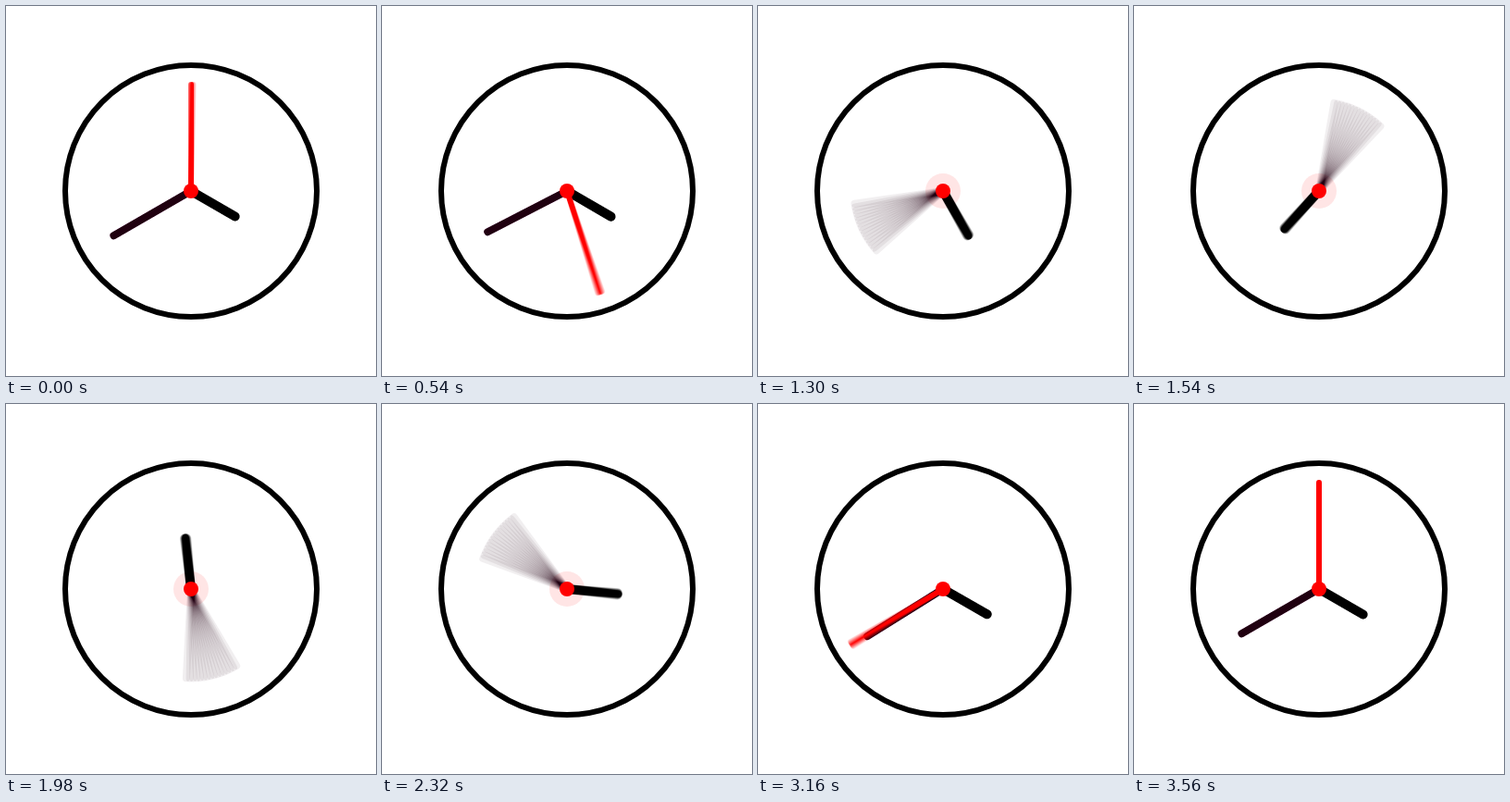
These frames come from a looping animation (400x400 px, 3600 ms). An HTML page with a canvas:

```html
<!DOCTYPE html>
<html lang="en">
<head>
<meta charset="utf-8">
<title>Clock</title>
<style>
  html, body { margin: 0; width: 100%; height: 100%; overflow: hidden; background: #fff; }
  canvas { display: block; width: 100vmin; height: 100vmin; }
</style>
</head>
<body>
<canvas id="stage" width="400" height="400"></canvas>
<script>
const SIZE = 400, MID = SIZE / 2, LOOP = 3600, FRAME = 20;
const SAMPLES = 16, SHUTTER = FRAME / 2;
const FAST = 1200, SLOW = 2400, RESUME = 2410, STOP = 3540;

const ctx = document.getElementById('stage').getContext('2d');
const layer = document.createElement('canvas');
layer.width = layer.height = SIZE;
const ink = layer.getContext('2d');
ink.lineCap = 'round';

const clamp = x => Math.min(1, Math.max(0, x));
const rushing = ms => ms > FAST && ms < SLOW;

// Clock minutes gone by: one slow minute, a rush of 718, one slow minute.
const elapsed = ms =>
  clamp(ms / FAST) +
  718 * clamp((ms - FAST) / (SLOW - FAST)) +
  clamp((ms - RESUME) / (STOP - RESUME));

const hands = [
  { length: 55, width: 10, color: '#000', start: 120, rate: 0.5 },
  { length: 96.5, width: 8, color: '#180408', start: 240, rate: 6 },
  { length: 115, width: 6, color: '#f00', start: 0, rate: 360, skip: rushing }
];

function disc(radius, color) {
  ctx.fillStyle = color;
  ctx.beginPath();
  ctx.arc(MID, MID, radius, 0, 2 * Math.PI);
  ctx.fill();
}

// Averages the hand over the open shutter, centred on ms.
function drawHand({ length, width, color, start, rate, skip }, ms) {
  ink.globalCompositeOperation = 'lighter';
  ink.clearRect(0, 0, SIZE, SIZE);
  ink.globalAlpha = 1 / SAMPLES;
  ink.strokeStyle = color;
  ink.lineWidth = width;
  for (let i = 0; i < SAMPLES; i++) {
    const at = ms + ((i + 0.5) / SAMPLES - 0.5) * SHUTTER;
    if (skip && skip(at)) continue;
    const a = (start + rate * elapsed(at)) * Math.PI / 180;
    ink.beginPath();
    ink.moveTo(MID, MID);
    ink.lineTo(MID + length * Math.sin(a), MID - length * Math.cos(a));
    ink.stroke();
  }
  ctx.drawImage(layer, 0, 0);
}

function draw(ms) {
  ctx.fillStyle = '#fff';
  ctx.fillRect(0, 0, SIZE, SIZE);
  ctx.strokeStyle = '#000';
  ctx.lineWidth = 6;
  ctx.beginPath();
  ctx.arc(MID, MID, 136, 0, 2 * Math.PI);
  ctx.stroke();
  if (rushing(ms)) disc(19, '#ffe5e5');
  for (const hand of hands) drawHand(hand, ms);
  disc(8, '#f00');
}

const begin = performance.now();
function tick() {
  const ms = (performance.now() - begin) % LOOP;
  draw(Math.floor(ms / FRAME) * FRAME);
  requestAnimationFrame(tick);
}
tick();
</script>
</body>
</html>
```
